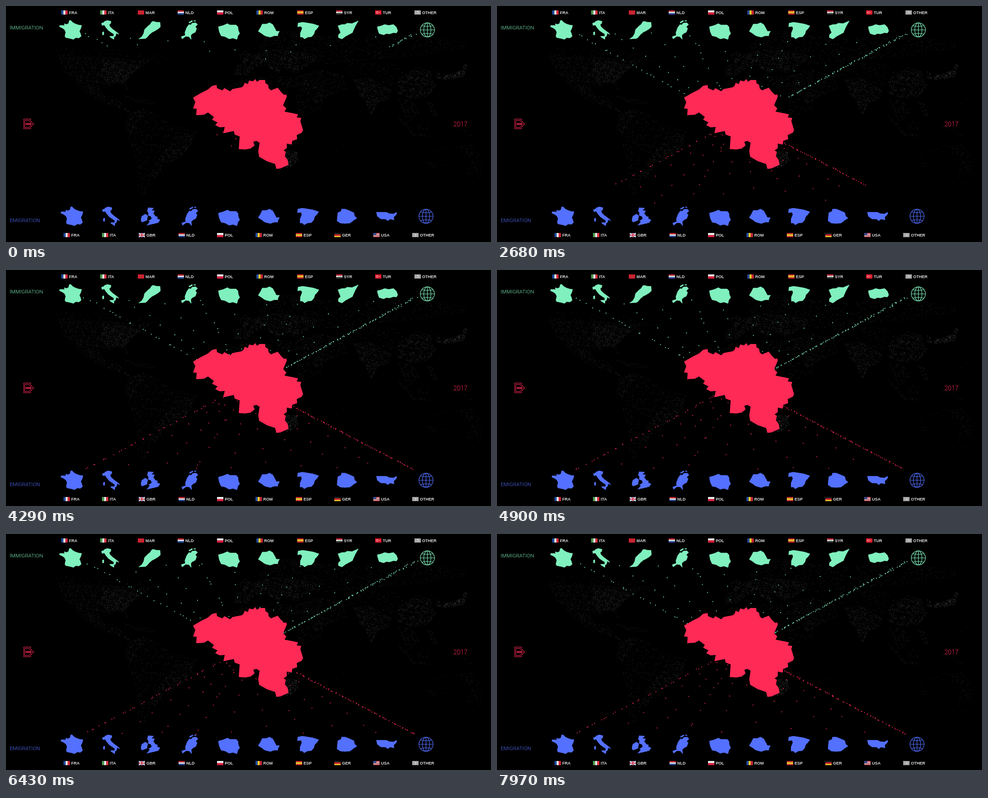
Animation of 1071 by 523 pixels, one loop 8000 ms. Source, as an HTML page with a canvas:

```html
<!DOCTYPE html>
<html lang="en">
<head>
<meta charset="utf-8">
<title>Migration flows</title>
<style>
html, body { margin: 0; width: 100%; height: 100%; overflow: hidden; background: #000; }
canvas { display: block; }
</style>
</head>
<body>
<canvas id="stage" width="1071" height="523"></canvas>
<script>
const W = 1071, H = 523, LOOP = 8000, STEP = 76.7, SPEED = 86;
const GREEN = '#80f0be', RED = '#ff2a56', BLUE = '#5470ff';
const INFLOW = [535, 262], OUTFLOW = [535, 251];
const ctx = document.getElementById('stage').getContext('2d');

const country = new Path2D('M413 203 432 192 446 185 455 177 465 175 466 182 478 187 482 182 495 189 500 184 521 180 ' +
  '525 176 527 170 534 173 537 165 545 167 551 162 554 168 560 164 572 164 573 171 579 175 580 182 585 187 600 181 ' +
  '607 190 614 197 619 196 620 201 612 220 619 227 615 234 645 240 642 247 652 248 650 255 656 275 653 281 642 286 ' +
  '643 295 632 299 631 307 620 305 620 315 613 320 618 323 616 333 622 341 624 352 606 360 597 361 594 350 576 344 ' +
  '559 334 557 322 560 303 553 299 546 301 549 309 540 316 528 318 514 317 516 289 505 285 503 277 480 282 483 268 ' +
  '472 269 462 264 467 258 455 252 459 246 446 236 437 241 420 242 421 228 413 227 418 213Z');

const shapes = {
  FRA: 'M140 32 143 32 148 37 154 40 160 42 167 43 165 50 162 56 164 60 166 67 161 71 154 70 149 74 142 72 132 70 130 67 132 58 129 52 123 48 118 46 119 43 126 43 129 44 129 39 133 41 138 39Z',
  ITA: 'M211 38 215 37 218 34 224 32 232 34 231 39 228 40 229 45 235 51 239 54 247 60 249 63 243 60 243 63 241 68 238 67 238 62 233 59 226 54 221 48 217 42 212 43ZM229 67 239 67 238 74 230 69ZM213 58 216 57 216 64 213 64Z',
  MAR: 'M325 34 333 36 340 36 341 46 337 50 329 55 323 58 317 63 311 70 308 72 293 73 300 68 304 61 306 52 313 45 318 41 322 35Z',
  NLD: 'M404 41 408 42 411 38 419 37 423 41 418 46 421 50 418 58 412 61 408 65 409 74 404 68 397 67 389 73 387 68 396 65 395 59 399 48ZM404 36 411 32 412 34 405 38ZM414 33 419 32 418 34Z',
  POL: 'M469 46 480 43 489 39 494 42 508 42 512 46 513 54 516 61 512 66 510 74 501 71 493 73 484 68 475 66 471 57Z',
  ROM: 'M557 56 562 48 566 40 575 40 582 37 589 41 594 50 597 56 604 56 601 61 600 66 592 66 584 69 575 67 570 65 565 61Z',
  ESP: 'M645 38 655 36 668 38 679 40 691 44 687 50 682 55 680 62 675 68 666 69 659 73 655 69 650 69 650 60 654 50 652 45 644 46Z',
  SYR: 'M778 33 771 45 767 54 765 59 750 67 742 73 734 70 734 64 739 59 737 54 733 44 742 41 748 41 754 38 764 39Z',
  TUR: 'M820 46 829 44 836 41 845 43 856 41 862 47 865 55 862 60 856 59 847 62 840 61 834 64 824 61 821 52Z',
  GBR: 'M314 447 326 448 321 453 328 454 325 460 330 466 335 468 333 471 340 474 336 480 328 482 319 484 311 486 318 478 315 476 322 472 320 466 314 464 315 458 312 455ZM300 466 308 461 313 465 311 475 300 479 298 474Z',
  GER: 'M741 450 749 450 759 454 768 458 770 466 775 470 766 476 760 481 748 482 738 481 731 476 732 466 733 458 740 455Z',
  USA: 'M818 457 840 457 846 460 855 461 863 457 862 462 856 468 857 474 848 472 843 476 838 472 828 472 820 466Z'
};

// Stripe direction and colours of each flag
const flags = {
  FRA: ['v', '#1c4da0', '#eee', '#e0283a'], ITA: ['v', '#4aa050', '#eee', '#dd3540'],
  MAR: ['h', '#cf1f33'], NLD: ['h', '#c02838', '#eee', '#2850a0'], POL: ['h', '#eee', '#dd2040'],
  ROM: ['v', '#2450a8', '#f5d030', '#d02838'], ESP: ['h', '#d02030', '#f5c530', '#f5c530', '#d02030'],
  SYR: ['h', '#d02538', '#eee', '#333'], TUR: ['h', '#dc1c2e'], GBR: ['h', '#2a3f86'],
  GER: ['h', '#222', '#d82030', '#f5c830'], USA: ['h', '#d03040', '#eee', '#d03040', '#eee', '#d03040'],
  OTHER: ['h', '#a8a8a8']
};

// code, flag x, outer end of the route, first departure (s), interval (s)
const arrivals = [
  ['FRA', 122, 167, 57, -.75, .16], ['ITA', 208, 255, 58, -.56, .36], ['MAR', 291, 340, 58, -.31, .43],
  ['NLD', 379, 430, 66, -.45, .21], ['POL', 466, 501, 72, -.3, .385], ['ROM', 553, 580, 74, -.52, .28],
  ['ESP', 643, 650, 72, -.4, .27], ['SYR', 729, 735, 72, -.26, .46], ['TUR', 815, 818, 66, -.05, .62],
  ['OTHER', 902, 906, 60, -.73, .041]
];
const departures = [
  ['FRA', 127, 167, 446, -.85, .12], ['ITA', 212, 257, 442, -.43, .55], ['GBR', 293, 342, 442, -.37, .36],
  ['NLD', 381, 417, 445, -.8, .24], ['POL', 466, 497, 445, -.45, .42], ['ROM', 551, 578, 445, -.54, .44],
  ['ESP', 640, 659, 445, -.72, .37], ['GER', 725, 740, 445, -.38, .48], ['USA', 811, 815, 440, -.38, .46],
  ['OTHER', 897, 903, 444, -.96, .05]
];
// Offset of the repeated country shapes in the lower row
const lowerShift = { FRA: [3, 413], ITA: [2, 413], NLD: [1, 413], POL: [0, 413], ROM: [0, 413], ESP: [-.5, 412] };

// Populated areas: outline, points per 100 square px, brightness
const lands = [
  ['M115 108 140 112 230 114 290 122 322 116 300 134 280 148 264 166 268 186 258 174 238 171 220 182 205 170 160 168 128 145Z', 17, .17],
  ['M215 125 250 122 296 134 278 150 262 168 225 170 208 155Z', 22, .2],
  ['M150 166 205 176 214 200 240 200 252 214 275 236 250 226 208 212 175 190Z', 16, .18],
  ['M105 92 250 98 360 112 345 125 300 122 120 108Z', 2.5, .17],
  ['M258 198 300 206 330 213 328 217 290 214Z', 12, .2],
  ['M270 240 300 228 340 245 362 262 418 278 412 302 390 330 364 348 345 370 318 385 302 422 292 415 291 350 278 310 264 275Z', 6, .19],
  ['M350 320 385 290 412 282 410 305 386 334 352 348 328 380 316 372Z', 13, .2],
  ['M264 270 272 240 300 229 326 236 290 250 276 282Z', 12, .2],
  ['M505 152 506 132 526 128 514 108 528 100 545 108 570 96 600 97 660 102 690 112 660 136 640 148 612 136 600 150 575 130 552 134 532 152Z', 22, .23],
  ['M555 90 580 68 610 56 640 56 636 90 600 98 590 84 566 96Z', 9, .19],
  ['M620 60 760 72 900 66 1010 80 1015 92 900 112 800 118 690 130 650 100Z', 4.5, .22],
  ['M480 182 520 162 570 158 640 156 690 140 742 154 752 182 706 202 684 216 654 176 620 180 560 170Z', 11, .2],
  ['M768 164 800 158 850 186 846 204 822 212 805 242 794 214 778 192Z', 25, .21],
  ['M760 125 860 130 900 160 850 176 790 150 740 160Z', 4, .2],
  ['M870 158 910 136 936 145 950 176 930 200 896 206 862 192Z', 19, .23],
  ['M962 154 985 151 1006 142 1013 128 1018 132 1010 156 980 162 966 164Z', 42, .32],
  ['M945 144 956 148 960 162 950 160Z', 30, .3],
  ['M866 206 896 210 912 236 900 246 886 262 878 240Z', 13, .2],
  ['M866 246 890 266 900 282 940 286 938 290 896 286Z', 15, .22],
  ['M930 212 942 216 952 244 944 246Z', 13, .23],
  ['M905 262 932 248 930 272 912 276Z', 4, .18],
  ['M980 262 1026 280 1032 288 996 280Z', 3, .18],
  ['M1000 312 1026 308 1054 340 1046 366 1020 372 1030 340Z', 4, .22],
  ['M922 330 990 308 1040 325 1040 364 985 352 930 356Z', 1.2, .2],
  ['M1016 380 1050 368 1040 388 1008 402Z', 1.2, .2],
  ['M618 320 640 322 646 342 632 354 618 358Z', 40, .27],
  ['M660 160 700 180 696 226 650 250 640 200Z', 6, .19]
];

function randomSource(seed) {
  return () => {
    seed = seed + 0x6D2B79F5 | 0;
    let t = Math.imul(seed ^ seed >>> 15, 1 | seed);
    t = t + Math.imul(t ^ t >>> 7, 61 | t) ^ t;
    return ((t ^ t >>> 14) >>> 0) / 4294967296;
  };
}

function drawMap(g) {
  const random = randomSource(7);
  for (const [outline, density, light] of lands) {
    const path = new Path2D(outline);
    const nums = outline.match(/\d+/g).map(Number);
    const xs = nums.filter((_, i) => i % 2 === 0), ys = nums.filter((_, i) => i % 2);
    const x0 = Math.min(...xs), y0 = Math.min(...ys);
    const w = Math.max(...xs) - x0, h = Math.max(...ys) - y0;
    for (let i = w * h * density / 100; i > 0; i--) {
      const x = x0 + random() * w, y = y0 + random() * h;
      const clump = .5 + .25 * Math.sin(x * .31 + y * .17) + .25 * Math.sin(y * .43 - x * .13);
      if (random() > clump + .3 || !g.isPointInPath(path, x, y)) continue;
      g.fillStyle = `rgba(205,212,212,${light * (.4 + 1.2 * random() ** 3)})`;
      g.fillRect(x, y, 1, 1);
    }
    g.strokeStyle = `rgba(200,205,205,${light * .4})`;
    g.lineWidth = .7;
    g.setLineDash([1, 2, 3, 4]);
    g.stroke(path);
  }
  g.setLineDash([]);
  g.fillStyle = 'rgba(200,205,205,.13)';
  for (const [x, y] of [[4, 198], [10, 202], [32, 313], [722, 318], [729, 321], [1024, 216]]) g.fillRect(x, y, 2, 1);
}

function text(g, str, x, y, font, color) {
  g.font = font;
  g.fillStyle = color;
  g.textBaseline = 'alphabetic';
  g.fillText(str, x, y);
}

function line(g, color, width, ...points) {
  g.strokeStyle = color;
  g.lineWidth = width;
  g.beginPath();
  points.forEach(([x, y]) => g.lineTo(x, y));
  g.stroke();
}

function disc(g, x, y, r, color) {
  g.fillStyle = color;
  g.beginPath();
  g.arc(x, y, r, 0, Math.PI * 2);
  g.fill();
}

function drawFlag(g, code, x, y) {
  const [dir, ...colors] = flags[code], w = 14, h = 9.5, n = colors.length;
  g.save();
  g.translate(x, y);
  g.beginPath();
  g.rect(0, 0, w, h);
  g.clip();
  colors.forEach((c, i) => {
    g.fillStyle = c;
    if (dir === 'v') g.fillRect(i * w / n, 0, w / n, h);
    else g.fillRect(0, i * h / n, w, h / n);
  });
  if (code === 'MAR') disc(g, 7, 4.8, 1.5, '#8a5a28');
  if (code === 'SYR') [5, 9].forEach(cx => disc(g, cx, 4.8, .8, '#4a8050'));
  if (code === 'TUR') {
    disc(g, 5.5, 4.8, 2.4, '#eee');
    disc(g, 6.2, 4.8, 1.9, '#dc1c2e');
    disc(g, 8.8, 4.8, .9, '#eee');
  }
  if (code === 'GBR') {
    line(g, '#eee', 2, [0, 0], [w, h]);
    line(g, '#eee', 2, [0, h], [w, 0]);
    for (const [c, s] of [['#eee', 3.4], ['#d02840', 1.8]]) {
      line(g, c, s, [7, 0], [7, h]);
      line(g, c, s, [0, 4.75], [w, 4.75]);
    }
  }
  if (code === 'USA') {
    g.fillStyle = '#3c4f90';
    g.fillRect(0, 0, 6.5, 5);
  }
  if (code === 'OTHER') text(g, '?', 4.8, 7.8, 'bold 8px "Liberation Sans", sans-serif', '#e4e4e4');
  g.restore();
}

function drawGlobe(g, x, y, color) {
  g.strokeStyle = color;
  g.lineWidth = 1.2;
  for (const rx of [15.6, 8]) {
    g.beginPath();
    g.ellipse(x, y, rx, 15.6, 0, 0, Math.PI * 2);
    g.stroke();
  }
  line(g, color, 1.2, [x, y - 15.6], [x, y + 15.6]);
  line(g, color, 1.2, [x - 15.6, y], [x + 15.6, y]);
  for (const s of [-1, 1]) {
    g.beginPath();
    g.moveTo(x - 12.4, y + s * 9.5);
    g.quadraticCurveTo(x, y + s * 6, x + 12.4, y + s * 9.5);
    g.stroke();
  }
}

function drawRow(g, routes, color, flagY, globe, shifts) {
  for (const [code, x] of routes) {
    drawFlag(g, code, x, flagY);
    text(g, code, x + 17, flagY + 8, 'bold 9px "Liberation Sans", Arial, sans-serif', '#dcdcdc');
    if (!shapes[code]) continue;
    g.save();
    g.translate(...(shifts[code] || [0, 0]));
    g.fillStyle = g.strokeStyle = color;
    g.lineWidth = .8;
    g.lineJoin = 'round';
    g.fill(new Path2D(shapes[code]));
    g.stroke(new Path2D(shapes[code]));
    g.restore();
  }
  drawGlobe(g, ...globe, color);
}

function drawExit(g) {
  line(g, RED, 1, [54.5, 255], [54.5, 250.5], [39, 250.5], [39, 272], [54.5, 272], [54.5, 267.5]);
  line(g, RED, 1, [51.5, 257], [51.5, 253.5], [41.5, 253.5], [41.5, 269.5], [51.5, 269.5], [51.5, 266]);
  line(g, RED, 1, [44, 260], [55, 260], [55, 255.5], [62, 261.5], [55, 267.5], [55, 263], [44, 263], [44, 260]);
  line(g, RED, 1, [45, 261.5], [60, 261.5]);
}

const scenery = document.createElement('canvas');
scenery.width = W;
scenery.height = H;

function drawScenery() {
  const g = scenery.getContext('2d');
  g.fillStyle = '#000';
  g.fillRect(0, 0, W, H);
  drawMap(g);
  drawRow(g, arrivals, GREEN, 9.5, [930.5, 53], {});
  drawRow(g, departures, BLUE, 503, [927.5, 466], lowerShift);
  const light = '300 11.5px Roboto, "Liberation Sans", sans-serif';
  text(g, 'IMMIGRATION', 8, 52, light, GREEN);
  text(g, 'EMIGRATION', 8, 479, light, BLUE);
  text(g, '2017', 988, 266.5, '300 14px Roboto, "Liberation Sans", sans-serif', RED);
  drawExit(g);
}

// Each traveller leaves at a jittered interval and moves straight at constant speed.
function makeTravellers(routes, inward, seed) {
  const random = randomSource(seed), list = [];
  for (const [, , x, y, first, interval] of routes) {
    const loose = interval < .25 ? 1.4 : .5;
    for (let k = 0; first + k * interval < LOOP / 1000; k++) {
      const start = first + k * interval + (k ? (random() - .5) * loose * interval : 0);
      const outer = [x + (random() - .5) * (inward ? 11 : 4), y];
      const from = inward ? outer : [OUTFLOW[0] + (random() - .5) * 10, OUTFLOW[1]];
      const to = inward ? INFLOW : outer;
      list.push({ start, from, to, length: Math.hypot(to[0] - from[0], to[1] - from[1]) });
    }
  }
  return list;
}

const incoming = makeTravellers(arrivals, true, 11);
const outgoing = makeTravellers(departures, false, 23);

function drawTravellers(list, color, time) {
  for (const { start, from, to, length } of list) {
    const p = (time - start) * SPEED / length;
    if (p < 0 || p > 1) continue;
    disc(ctx, from[0] + (to[0] - from[0]) * p, from[1] + (to[1] - from[1]) * p, 1.05, color);
  }
}

function render(now) {
  const time = Math.floor((now % LOOP + 6.7) / STEP) * STEP / 1000;
  ctx.drawImage(scenery, 0, 0);
  drawTravellers(incoming, GREEN, time);
  drawTravellers(outgoing, RED, time);
  ctx.fillStyle = RED;
  ctx.fill(country);
}

drawScenery();
const began = performance.now();
function tick() {
  render(performance.now() - began);
  requestAnimationFrame(tick);
}
tick();
</script>
</body>
</html>
```
